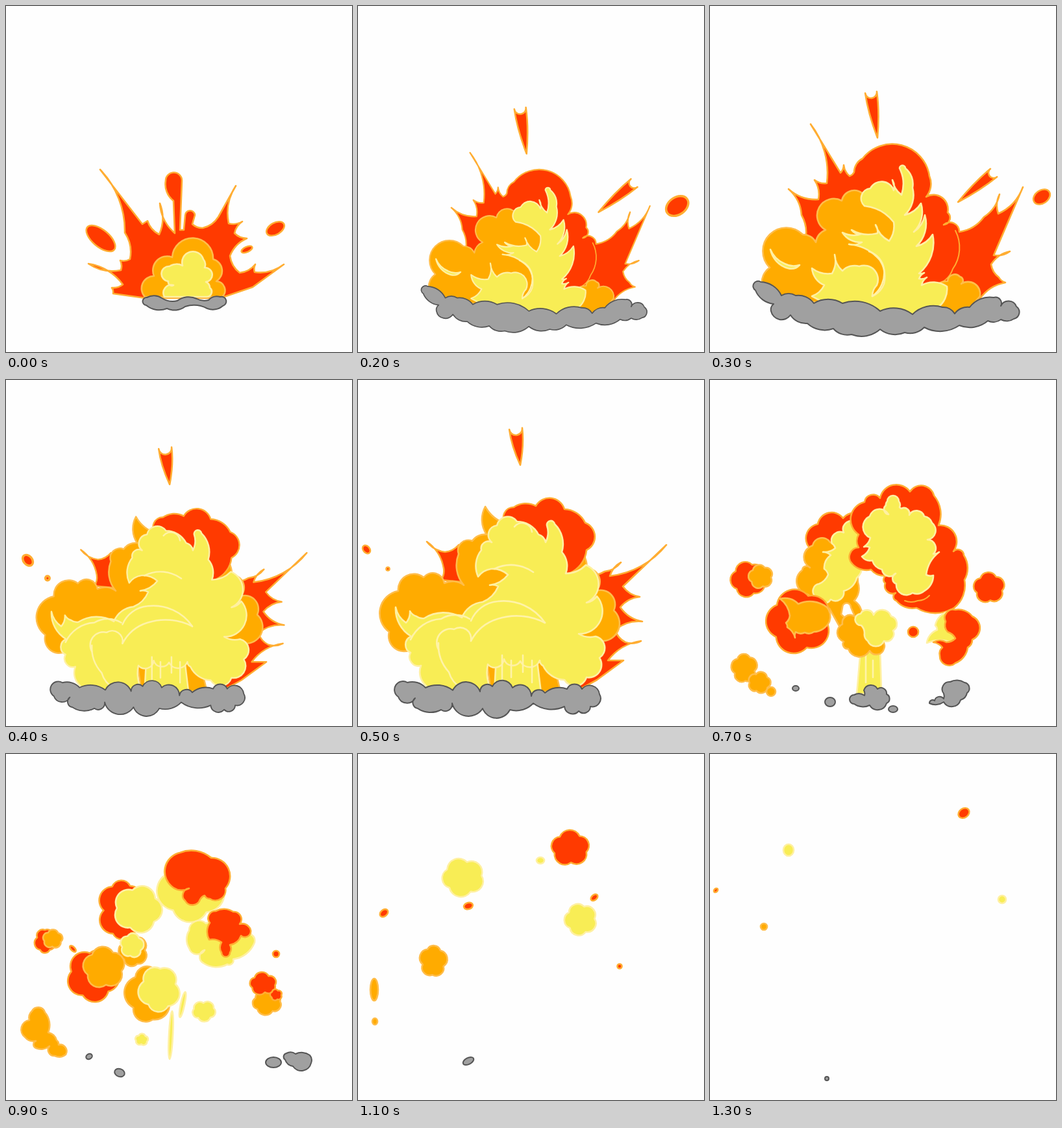
These frames come from a looping animation (533x533 px, 1.4 s). An HTML page:

```html
<!DOCTYPE html>
<html lang="en">
<head>
<meta charset="utf-8">
<title>Explosion</title>
<style>
html, body { margin: 0; width: 100%; height: 100%; overflow: hidden; background: #fefefe; }
svg { display: block; width: 100vw; height: 100vh; }
path { stroke-linejoin: round; stroke-linecap: round; stroke-width: 2.6; }
.red { fill: #ff3a00; stroke: #ffad32; }
.orange { fill: #ffab00; stroke: #ffbd4a; }
.yellow { fill: #f8ed55; stroke: #fff0a2; }
.grey { fill: #a0a0a0; stroke: #555; stroke-width: 2; }
.white { fill: #fefefe; stroke: #ffbd4a; }
.line { fill: none; stroke: #fff3a8; }
.rim { fill: none; stroke: #ffad32; stroke-width: 2; }
.pose { visibility: hidden; animation: show 1.4s step-end infinite; animation-delay: calc(var(--i) * 100ms - 1400ms); }
@keyframes show { 0% { visibility: visible; } 7.14285%, 100% { visibility: hidden; } }
</style>
</head>
<body>
<svg id="stage" viewBox="0 0 533 533" preserveAspectRatio="none"></svg>
<script>
const HUB = [270, 470];   // everything flies away from here
const RATE = .08;         // share of the distance covered per step

// Edge kinds: arch, lobe, soft curve, line, hollow.
const BEND = { a: .5, o: .33, s: .14, l: 0, h: -.1 };

const path = (ink, d) => `<path class="${ink}" d="${d}"/>`;

function edge(x, y, u, v, bend) {
  if (!bend) return `L${u} ${v}`;
  const b = Math.abs(bend), r = Math.hypot(u - x, v - y) * (1 / (8 * b) + b / 2);
  return `A${r.toFixed(2)} ${r.toFixed(2)} 0 0 ${+(bend > 0)} ${u} ${v}`;
}

// Corners clockwise; a letter sets the kind of edge leaving the corners after it.
function shape(ink, text) {
  const pts = [];
  let bend = 0;
  for (const word of text.trim().split(/\s+/)) {
    if (word in BEND) bend = BEND[word];
    else pts.push([...word.split(',').map(Number), bend]);
  }
  const open = ink === 'line' || ink === 'rim';
  let d = `M${pts[0][0]} ${pts[0][1]}`;
  pts.forEach(([x, y, b], i) => {
    if (open && i === pts.length - 1) return;
    const [u, v] = pts[(i + 1) % pts.length];
    d += edge(x, y, u, v, b);
  });
  return path(ink, d + (open ? '' : 'Z'));
}

// A small cloud: even lobes around an ellipse.
function blob(ink, x, y, rx, ry, lobes = 5) {
  const cusps = Array.from({ length: lobes }, (_, i) => {
    const a = x + i * 2 * Math.PI / lobes;
    return `${(x + .89 * rx * Math.cos(a)).toFixed(1)},${(y + .89 * ry * Math.sin(a)).toFixed(1)}`;
  });
  return shape(ink, 'o ' + cusps.join(' '));
}

function dot(ink, x, y, rx, ry = rx, turn = 0) {
  const a = turn * Math.PI / 180, dx = rx * Math.cos(a), dy = rx * Math.sin(a);
  const arc = `a${rx} ${ry} ${turn} 0 1 `;
  return path(ink, `M${x - dx} ${y - dy}${arc}${2 * dx} ${2 * dy}${arc}${-2 * dx} ${-2 * dy}Z`);
}

// A teardrop from its tail to a round head.
function drop(ink, tx, ty, hx, hy, r) {
  const len = Math.hypot(hx - tx, hy - ty), ux = (hx - tx) / len, uy = (hy - ty) / len;
  const at = (side, back) => `${hx + side * uy * r - ux * back} ${hy - side * ux * r - uy * back}`;
  return path(ink, `M${tx} ${ty}Q${at(1, len * .45)} ${at(1, 0)}A${r} ${r} 0 0 0 ${at(-1, 0)}Q${at(-1, len * .45)} ${tx} ${ty}Z`);
}

const strands = (...tops) => tops.map((x, i) => shape('line', `${x},${424 + i % 2 * 8} ${x},${466 - i % 3 * 8}`)).join('');

// A piece flies outward and grows by a factor at every step.
const fly = (x, y, grow, ...shapes) => k => {
  const dx = (x - HUB[0]) * RATE * k, dy = (y - HUB[1]) * RATE * k;
  return `<g transform="translate(${x + dx} ${y + dy}) scale(${grow ** k}) translate(${-x} ${-y})">${shapes.join('')}</g>`;
};
const body = (grow, ...shapes) => fly(...HUB, grow, ...shapes);
const bit = (make, ink, x, y, ...size) => fly(x, y, .75, make(ink, x, y, ...size));

const burst = [
  body(1.3,
    shape('red', `l 145,252 210,336 h 218,331 236,352 237,304 l 260,350 s 258,300 a 246,269 l 271,269 268,345 274,345
      a 276,323 l 291,322 h 287,336 303,342 l 327,325 h 354,277 343,335 364,332 352,350 371,358 345,385 360,411 384,398
      383,410 l 428,398 380,433 330,450 215,450 h 165,443 163,434 180,429 127,397 177,407 176,392 191,390 183,349`),
    shape('orange', 'o 214,448 228,416 a 256,387 o 319,390 324,424 l 333,448'),
    shape('yellow', 'o 244,448 258,430 a 250,424 s 252,401 a 272,400 s 304,390 a 306,403 s 308,425 o 314,434 l 310,448'),
    shape('grey', 'a 216,461 s 217,449 h 240,450 s 264,454 h 294,451 s 312,453 a 330,448 s 334,462 h 310,466 s 276,463 248,466')),
  bit(dot, 'red', 146, 358, 27, 13, 40),
  bit(dot, 'red', 415, 343, 15, 9, -30),
  bit(dot, 'red', 371, 375, 9, 4, -25)
];

const blast = [
  body(1.18,
    shape('red', `h 146,364 141,322 121,282 167,298 161,268 180,273 l 155,182 h 201,257 206,245 215,262 s 222,256 o 235,235
      s 338,262 o 333,294 366,318 360,337 h 384,348 422,325 446,290 444,320 l 482,279 h 437,384 462,378 433,398 445,418
      455,426 l 415,452 200,452`),
    shape('rim', 's 378,346 374,405 345,430'),
    shape('orange', 's 80,430 a 92,403 s 143,352 163,364 a 178,345 o 203,300 s 238,292 o 284,335 l 290,365 270,445 200,458 100,452'),
    shape('orange', 'o 345,470 366,424 385,417 387,428 l 416,447 400,465 375,474'),
    shape('yellow', `h 157,447 s 176,430 h 157,404 188,412 192,383 s 204,408 o 230,401 h 257,430 250,447 268,428 262,392
      214,367 s 234,364 h 204,349 s 234,351 h 218,345 258,350 255,337 276,362 283,333 o 238,308 247,281 h 283,284 281,268
      295,291 a 292,250 s 301,250 312,280 h 300,322 s 325,304 h 314,348 s 331,322 h 318,370 s 343,352 h 322,412 330,411
      322,420 334,418 s 326,430 365,432 l 350,465 300,478 200,470`),
    shape('line', 's 245,378 268,405 250,447'),
    shape('yellow', 'h 93,375 115,397 s 138,399 120,404'),
    shape('grey', `a 70,438 s 78,425 110,446 132,446 160,458 204,458 262,470 312,475 358,464 377,474 400,464 o 437,449 448,462
      472,463 s 468,482 448,483 428,485 384,492 330,495 300,503 262,498 218,506 190,497 150,489 o 124,476 s 94,470 98,459`)),
  fly(249, 163, 1, drop('red', 258, 203, 248, 133, 9)),
  fly(414, 275, 1, drop('red', 382, 302, 437, 257, 8)),
  bit(dot, 'red', 511, 294, 14, 10, -35)
];

const bloom = [
  body(1.06,
    shape('red', `h 340,300 380,295 405,281 388,302 l 475,254 h 408,318 434,334 404,350 438,372 396,385 412,404 436,402
      l 385,432 409,432 368,462 335,480 300,400`),
    shape('red', 'h 106,249 134,265 155,254 158,268 l 170,312 h 128,308 132,290'),
    shape('orange', 'o 82,415 48,388 62,325 101,304 s 133,313 163,316 o 155,268 s 176,248 198,238 h 196,195 l 230,222 300,400 220,420'),
    shape('orange', 's 340,262 o 352,290 367,325 394,355 l 378,402 300,400'),
    shape('red', 'o 228,222 s 240,196 o 274,194 s 318,199 o 350,220 s 352,262 l 325,298 290,330'),
    shape('orange', 'l 198,432 300,432 312,480 205,480'),
    shape('yellow', 'l 213,425 275,425 282,482 210,482'),
    shape('yellow', `s 185,303 o 190,262 206,250 214,224 s 245,218 278,238 h 289,250 a 291,224 s 303,222 314,265 h 320,298
      o 351,285 h 352,343 o 368,333 h 340,391 o 366,395 372,428 352,458 s 318,462 285,440 o 280,432 250,433 225,430 h 200,438
      l 208,482 115,482 s 102,468 o 97,440 81,420 s 82,395 h 58,350 74,374 80,356 90,364 s 102,367 160,366 h 192,342
      216,318 203,316 231,300 205,291`),
    shape('line', 's 174,371 215,341 288,374'),
    shape('line', 'h 288,374 215,368 174,402'),
    shape('line', 'o 124,415 148,384 174,402'),
    shape('line', 'h 124,405 140,450 160,475'),
    shape('line', 's 81,400 128,368 172,368'),
    shape('line', 's 210,291 270,296'),
    shape('line', 'o 241,226 268,234'),
    strands(222, 236, 254, 268),
    shape('grey', `a 62,488 s 76,466 104,474 o 146,478 188,480 207,472 238,474 267,487 s 288,482 o 322,476 345,476 372,484
      358,503 340,510 s 318,503 270,498 o 234,508 192,506 145,498 s 128,508 o 92,506 88,490`)),
  fly(243, 97, 1, drop('red', 250, 131, 243, 75, 10)),
  bit(dot, 'red', 13, 261, 7, 5, 50),
  bit(dot, 'red', 46, 291, 2.5)
];

const split = [
  fly(248, 440, .82, shape('yellow', 'l 232,415 262,415 264,478 226,485'), strands(240, 251)),
  fly(190, 275, .92,
    shape('red', 'o 157,262 166,222 s 205,213 l 228,205 240,270 170,270'),
    shape('orange', 'o 150,330 142,293 154,289 158,255 l 185,250 225,270 s 228,312 222,340 l 234,362 220,385 203,386 184,352'),
    shape('white', 'a 204,350 l 217,350 223,364 214,372 202,361'),
    shape('yellow', 'o 206,235 s 222,218 l 232,226 s 234,278 226,305 o 206,325 186,338 163,334 h 168,314 182,300 s 176,291 h 186,270 174,265 193,259 o 188,252')),
  fly(137, 372, .87,
    blob('red', 137, 372, 48, 47),
    shape('orange', 's 108,337 136,345 180,350 184,372 160,388 146,389 h 132,388 131,397 119,381 117,374 123,363')),
  fly(240, 385, .92,
    shape('orange', 'o 206,403 204,376 l 222,364 262,375 s 266,402 o 268,414 246,417 213,414'),
    shape('yellow', 'a 233,378 o 232,360 252,362 279,364 282,386 268,402 s 243,402 h 238,390')),
  fly(305, 258, .92,
    shape('red', 'o 229,238 238,188 262,182 308,172 s 345,178 o 352,224 375,264 s 391,270 392,308 376,351 318,351 o 287,340 286,328 270,313 s 273,301 248,292 o 219,283 s 229,258'),
    shape('yellow', 'o 275,207 s 271,193 a 273,187 s 291,187 h 292,196 o 295,198 307,208 s 330,210 o 342,220 335,246 h 344,268 353,265 333,300 s 344,301 330,325 o 312,328 287,314 286,298 s 265,292 250,278 h 234,272 246,258 237,257 o 247,243 246,210'),
    shape('rim', 'h 300,340 320,340 338,332')),
  fly(372, 398, .82,
    shape('yellow', 's 334,405 h 350,385 s 347,378 366,357 l 385,375 h 374,405'),
    shape('red', 'o 363,372 s 378,354 o 404,364 s 404,400 397,412 o 378,436 s 354,425 h 358,412 s 344,404 h 364,404 378,398 s 366,388')),
  bit(blob, 'red', 430, 320, 23, 22),
  bit(dot, 'red', 313, 388, 8),
  fly(64, 307, .82, blob('red', 59, 307, 26, 26), blob('orange', 78, 303, 18, 17)),
  fly(67, 454, .94, blob('orange', 53, 444, 18, 22), blob('orange', 76, 466, 17, 15), dot('orange', 94, 480, 7)),
  bit(dot, 'grey', 132, 475, 5, 4),
  bit(dot, 'grey', 185, 496, 8, 7),
  fly(247, 488, .6, shape('grey', 'a 222,499 s 222,485 h 238,486 o 237,478 258,476 272,484 272,498 s 246,501')),
  bit(dot, 'grey', 282, 507, 7, 5),
  fly(368, 483, .95, shape('grey', 'o 338,498 346,494 h 360,491 o 360,483 s 370,465 o 392,466 s 396,482 o 386,493 s 360,496'))
];

const drift = [
  fly(290, 202, .82,
    blob('yellow', 285, 204, 49, 53),
    shape('red', 'o 258,206 s 268,152 o 316,160 338,207 s 314,223 h 306,218 o 299,224 276,226 s 282,207')),
  fly(194, 240, .85, blob('red', 178, 240, 31, 47, 6), blob('yellow', 203, 239, 36, 34)),
  fly(195, 303, .55, blob('orange', 196, 303, 20, 24), blob('yellow', 194, 295, 17, 18)),
  fly(139, 338, .84, blob('red', 134, 341, 38, 39), blob('orange', 151, 329, 31, 30)),
  fly(228, 370, .6, blob('orange', 220, 370, 31, 45), blob('yellow', 236, 362, 29, 35)),
  fly(330, 285, .82,
    shape('yellow', 'o 306,302 s 282,299 o 282,272 s 308,261 340,262 o 365,278 s 383,290 o 350,316 s 341,324 o 304,322'),
    shape('red', 'o 314,260 s 323,242 o 350,243 s 360,262 a 374,266 s 362,280 345,294 a 345,306 s 332,306 h 332,290 s 313,286')),
  fly(402, 369, .5, blob('orange', 402, 383, 23, 16), blob('red', 396, 354, 21, 15), blob('red', 416, 371, 9, 8)),
  bit(dot, 'red', 416, 308, 5),
  bit(dot, 'red', 103, 300, 6, 3, 45),
  fly(66, 287, .6, blob('red', 60, 288, 14, 19), blob('orange', 72, 285, 15, 13)),
  fly(60, 430, .6, shape('orange', 's 36,410 o 40,396 s 60,398 65,429 78,441 o 81,448 s 92,463 o 75,465 s 67,450 o 46,453 s 46,442 o 29,436')),
  bit(blob, 'yellow', 305, 396, 18, 14),
  bit(blob, 'yellow', 209, 440, 10, 8),
  bit(dot, 'yellow', 254, 433, 37, 3, 93),
  bit(dot, 'yellow', 272, 386, 20, 3, 102),
  bit(dot, 'grey', 412, 475, 12, 8),
  fly(449, 471, .6, shape('grey', 'o 430,471 s 432,461 446,462 468,464 o 470,476 s 442,481')),
  bit(dot, 'grey', 128, 466, 5, 4, -30),
  bit(dot, 'grey', 175, 491, 8, 6, 20)
];

const specks = [
  bit(blob, 'red', 327, 145, 29, 25),
  bit(blob, 'yellow', 162, 190, 32, 27),
  bit(blob, 'yellow', 343, 255, 24, 23),
  bit(blob, 'orange', 116, 319, 19, 24),
  bit(dot, 'orange', 25, 363, 6, 17),
  bit(dot, 'orange', 26, 412, 4, 5),
  bit(dot, 'red', 40, 245, 7, 5, -40),
  bit(dot, 'red', 170, 234, 7, 5, -15),
  bit(dot, 'yellow', 281, 164, 6, 5),
  bit(dot, 'red', 364, 221, 6, 4, -40),
  bit(dot, 'red', 403, 327, 3.5),
  bit(dot, 'grey', 170, 473, 9, 5, -28)
];

const embers = [
  bit(dot, 'red', 391, 91, 9, 7, -35),
  bit(dot, 'yellow', 121, 148, 8, 9),
  bit(dot, 'yellow', 450, 224, 6),
  bit(dot, 'orange', 83, 266, 5),
  bit(dot, 'red', 9, 210, 3.5, 2.5, -45),
  bit(dot, 'grey', 180, 500, 3)
];

const timeline = [
  [burst, 0], [burst, 1], [blast, -1], [blast, 0], [bloom, -1], [bloom, 0], [split, -1],
  [split, 0], [split, 1], [drift, 0], [drift, 1], [specks, 0], [specks, 1], [embers, 0]
];

document.getElementById('stage').innerHTML = timeline.map(([pose, k], i) =>
  `<g class="pose" style="--i:${i}">${pose.map(piece => piece(k)).join('')}</g>`).join('');
</script>
</body>
</html>
```
